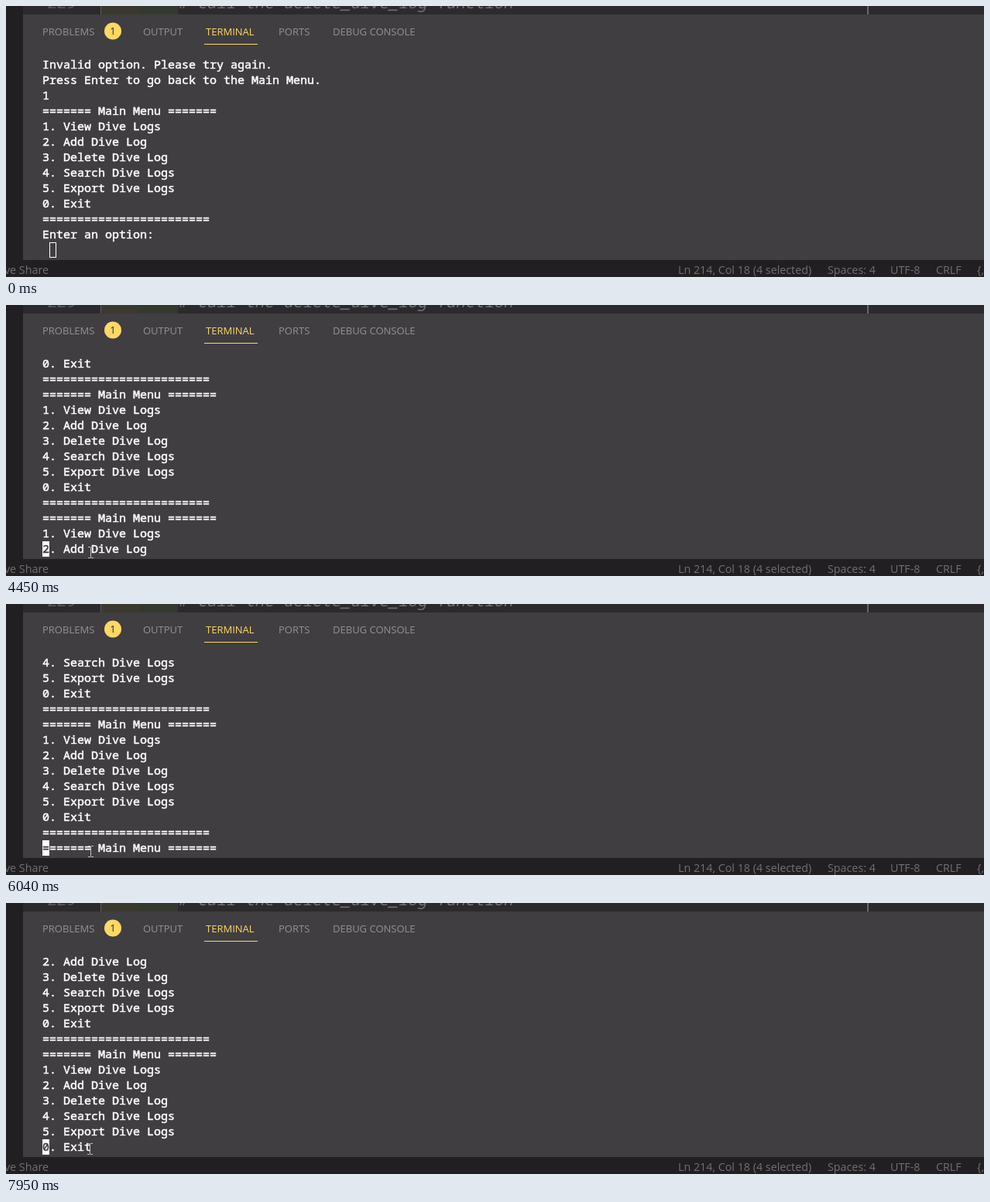
Animation of 1263x351 px, one loop 8000 ms. Source, as an HTML page with a canvas:

```html
<!DOCTYPE html>
<html lang="en">
<head>
<meta charset="utf-8">
<title>Terminal menu</title>
<style>
  html, body { margin: 0; width: 100%; height: 100%; overflow: hidden; background: #403e41; }
  canvas { display: block; }
</style>
</head>
<body>
<canvas id="stage" width="1263" height="351"></canvas>
<script>
const ctx = document.getElementById('stage').getContext('2d', { alpha: false });
const LOOP = 8000;
const MONO = '"Noto Sans Mono", monospace';
const UI = '"Open Sans", sans-serif';
const PANEL = '#403e41', DARK = '#221f22', EDITOR = '#2d2a2e';
const WHITE = '#fff', YELLOW = '#ffd866', GREY = '#939293', DIM = '#727072';

const PANEL_TOP = 11;
const CELL = 9, LINE = 20, LEFT = 47, TOP = 66, ROWS = 13;

const MENU = [
  '======= Main Menu =======',
  '1. View Dive Logs',
  '2. Add Dive Log',
  '3. Delete Dive Log',
  '4. Search Dive Logs',
  '5. Export Dive Logs',
  '0. Exit',
  '='.repeat(24)
];
const PROMPT = [
  'Invalid option. Please try again.',
  'Press Enter to go back to the Main Menu.',
  '1',
  ...MENU,
  'Enter an option:'
];

// Repaint times while the menu floods the terminal: [start, count], 70 ms apart.
const FLOOD = [[4450, 7], [5010, 7], [5540, 14], [6580, 1], [6710, 10], [7470, 6], [7950, 1]]
  .flatMap(([start, count]) => Array.from({ length: count }, (_, i) => start + 70 * i));

// [repaint index, lines printed so far]
const PRINTED = [[0, 2], [14, 69], [27, 134], [37, 187], [45, 230]];

const lerp = (a, b, u) => a + (b - a) * u;

function rect(x, y, w, h, color) {
  ctx.fillStyle = color;
  ctx.fillRect(x, y, w, h);
}

function disc(x, y, r, color) {
  ctx.fillStyle = color;
  ctx.beginPath();
  ctx.arc(x, y, r, 0, Math.PI * 2);
  ctx.fill();
}

function text(str, x, y, font, color, align = 'left') {
  ctx.font = font;
  ctx.fillStyle = color;
  ctx.textAlign = align;
  ctx.fillText(str, x, y);
}

function drawEditor() {
  const code = `20.6px ${MONO}`;
  rect(0, 0, 1263, PANEL_TOP, EDITOR);
  rect(122, 0, 50, PANEL_TOP, '#3b392f');
  rect(172, 0, 50, PANEL_TOP, '#343930');
  rect(122, 0, 1, PANEL_TOP, '#5b595c');
  rect(1112, 0, 2, PANEL_TOP, '#69676c');
  ctx.save();
  ctx.beginPath();
  ctx.rect(0, 0, 1263, PANEL_TOP);
  ctx.clip();
  text('229', 53, 3, code, '#5b595c');
  text('# Call the delete_dive_log function', 222, 3, `italic ${code}`, DIM);
  ctx.restore();
}

function drawTabs() {
  const font = `13px ${UI}`;
  const tabs = [['PROBLEMS', 47], ['OUTPUT', 177], ['TERMINAL', 258], ['PORTS', 352], ['DEBUG CONSOLE', 422]];
  for (const [label, x] of tabs) text(label, x, 38, font, label === 'TERMINAL' ? YELLOW : GREY);
  rect(256, 49, 69, 1, YELLOW);
  disc(138, 32.5, 11, YELLOW);
  text('1', 138, 37, font, EDITOR, 'center');
}

function drawStatus() {
  const font = `14.3px ${UI}`;
  rect(0, 329, 1263, 22, DARK);
  text('ve Share', 55, 347, font, DIM, 'right');
  const items = [['Ln 214, Col 18 (4 selected)', 868], ['Spaces: 4', 1061], ['UTF-8', 1142], ['CRLF', 1201], ['{,', 1254]];
  for (const [label, x] of items) text(label, x, 347, font, DIM);
}

// A thin outline gives the terminal face its medium weight.
function drawCell(str, row, col, color) {
  const x = LEFT + col * CELL, y = TOP + row * LINE + 15;
  text(str, x, y, `15px ${MONO}`, color);
  ctx.strokeStyle = color;
  ctx.lineWidth = 0.5;
  ctx.strokeText(str, x, y);
}

function drawBlock(col, char = '') {
  rect(LEFT + col * CELL, TOP + 12 * LINE, CELL, LINE, WHITE);
  drawCell(char, 12, col, PANEL);
}

function linesPrinted(step) {
  let k = 0;
  while (k < PRINTED.length - 2 && step >= PRINTED[k + 1][0]) k++;
  const [[s0, n0], [s1, n1]] = [PRINTED[k], PRINTED[k + 1]];
  return Math.round(lerp(n0, n1, (step - s0) / (s1 - s0)));
}

function drawTerminal(t) {
  const step = FLOOD.filter(time => time <= t).length - 1;
  if (step >= 0) {
    const last = linesPrinted(step);
    for (let row = 0; row < ROWS; row++) {
      drawCell(MENU[(last - 12 + row + 16) % 8], row, 0, WHITE);
    }
    drawBlock(0, MENU[last % 8][0]);
    return;
  }
  PROMPT.forEach((line, row) => drawCell(line, row, 0, WHITE));
  if (t >= 3200) {
    drawCell('0', 12, 1, WHITE);
    drawBlock(2);
  } else if (t >= 2180) {
    drawBlock(1);
  } else {
    ctx.strokeStyle = WHITE;
    ctx.lineWidth = 1;
    ctx.strokeRect(56.5, 306.5, 8, 19);
  }
}

function pointerAt(t) {
  if (t < 500) return [789, 349];
  if (t < 1340) {
    const u = (Math.min(12, Math.floor((t - 500) / 64.16)) + 1) / 13;
    const ease = u * u * (3 - 2 * u);
    return [lerp(789, 193, ease), 349 - 235 * u + 191 * u * u];
  }
  if (t < 7950) {
    const u = Math.min(6, Math.floor((t - 1340) / 70) + 1) / 6;
    const ease = 1 - (1 - u) ** 2;
    return [lerp(193, 109, ease), lerp(305, 320, ease)];
  }
  return [108, 318];
}

function drawArrow(x, y) {
  const outline = [[0, 0], [0, 16], [4, 12.5], [7, 18.5], [9.5, 17.5], [6.8, 11.6], [11.5, 11.5]];
  ctx.beginPath();
  for (const [dx, dy] of outline) ctx.lineTo(x + dx + 0.5, y + dy + 0.5);
  ctx.closePath();
  ctx.fillStyle = '#fff';
  ctx.fill();
  ctx.strokeStyle = '#000';
  ctx.lineWidth = 1;
  ctx.stroke();
}

function drawBeam(x, y) {
  const color = '#bfc1be';
  for (const end of [-7, 7]) {
    rect(x - 3, y + end, 3, 1, color);
    rect(x + 1, y + end, 3, 1, color);
  }
  rect(x, y - 6, 1, 13, color);
}

function drawPointer(t) {
  if (t < 330) return;
  const [x, y] = pointerAt(t).map(Math.round);
  if (t >= 2040 && t < 2180) disc(107, 319, 15, 'rgba(255, 255, 0, 0.47)');
  (y > 328 ? drawArrow : drawBeam)(x, y);
}

function draw(t) {
  rect(0, 0, 1263, 351, PANEL);
  drawEditor();
  rect(0, 0, 22, 351, DARK);
  drawTabs();
  drawTerminal(t);
  drawStatus();
  drawPointer(t);
}

const begin = performance.now();
function tick() {
  draw((performance.now() - begin) % LOOP);
  requestAnimationFrame(tick);
}
tick();
</script>
</body>
</html>
```
